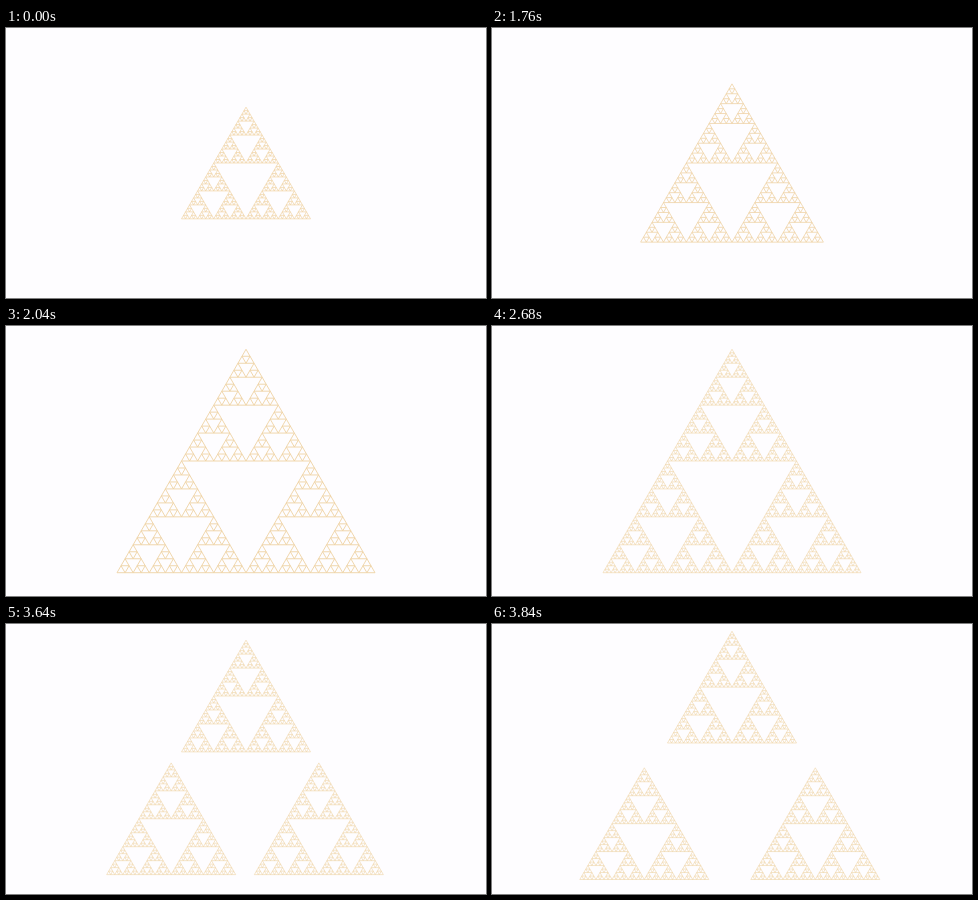
These frames come from a looping animation (480 px wide and 270 px high, 5000 ms). An HTML page with a canvas:

```html
<!DOCTYPE html>
<html lang="en">
<head>
<meta charset="utf-8">
<title>Sierpinski triangle</title>
<style>
html, body { margin: 0; width: 100%; height: 100%; overflow: hidden; background: #fefdff; }
canvas { display: block; width: 480px; height: 270px; }
</style>
</head>
<body>
<canvas id="stage" width="480" height="270"></canvas>
<script>
const ctx = document.getElementById('stage').getContext('2d');
const LOOP = 5000, TICK = 40, DEPTH = 5;
const SIDE = 129, RATIO = Math.sqrt(3) / 2, HEIGHT = SIDE * RATIO;
const CX = 240, CY = 135;

// Apex of each piece and how far it drifts.
const pieces = [
  { x: CX, y: CY - HEIGHT, dx: 0, dy: -16 },
  { x: CX - SIDE / 2, y: CY, dx: -23.2, dy: 8.8 },
  { x: CX + SIDE / 2, y: CY, dx: 18.8, dy: 8.8 }
];

// Steps completed, as a fraction, for motion whose first step shows at start.
function progress(t, start, steps) {
  const n = Math.floor((t - start) / TICK) + 1;
  return Math.max(0, Math.min(steps, n)) / steps;
}

function addTriangle(x, y, side, h) {
  ctx.moveTo(x, y);
  ctx.lineTo(x + side / 2, y + h);
  ctx.lineTo(x - side / 2, y + h);
  ctx.closePath();
}

function addHoles(x, y, side, depth) {
  if (!depth) return;
  const half = side / 2, h = half * RATIO;
  addTriangle(x, y + 2 * h, half, -h);
  addHoles(x, y, half, depth - 1);
  addHoles(x - half / 2, y + h, half, depth - 1);
  addHoles(x + half / 2, y + h, half, depth - 1);
}

function sierpinski(x, y, side, width) {
  ctx.lineWidth = width;
  ctx.beginPath();
  addTriangle(x, y, side, side * RATIO);
  addHoles(x, y, side, DEPTH);
  ctx.stroke();
}

function draw(t) {
  ctx.fillStyle = '#fefdff';
  ctx.fillRect(0, 0, 480, 270);
  ctx.strokeStyle = '#efd3a4';
  ctx.lineJoin = 'round';
  if (t < 2680) {
    const zoom = progress(t, 1600, 12), scale = 1 + zoom;
    sierpinski(CX, CY - HEIGHT * scale / 2, SIDE * scale, 0.7 + 0.2 * zoom);
  } else {
    const p = progress(t, 3520, 9);
    for (const s of pieces) sierpinski(s.x + s.dx * p, s.y + s.dy * p, SIDE, 0.6);
  }
}

const begin = performance.now();
function frame() {
  draw((performance.now() - begin) % LOOP);
  requestAnimationFrame(frame);
}
frame();
</script>
</body>
</html>
```
